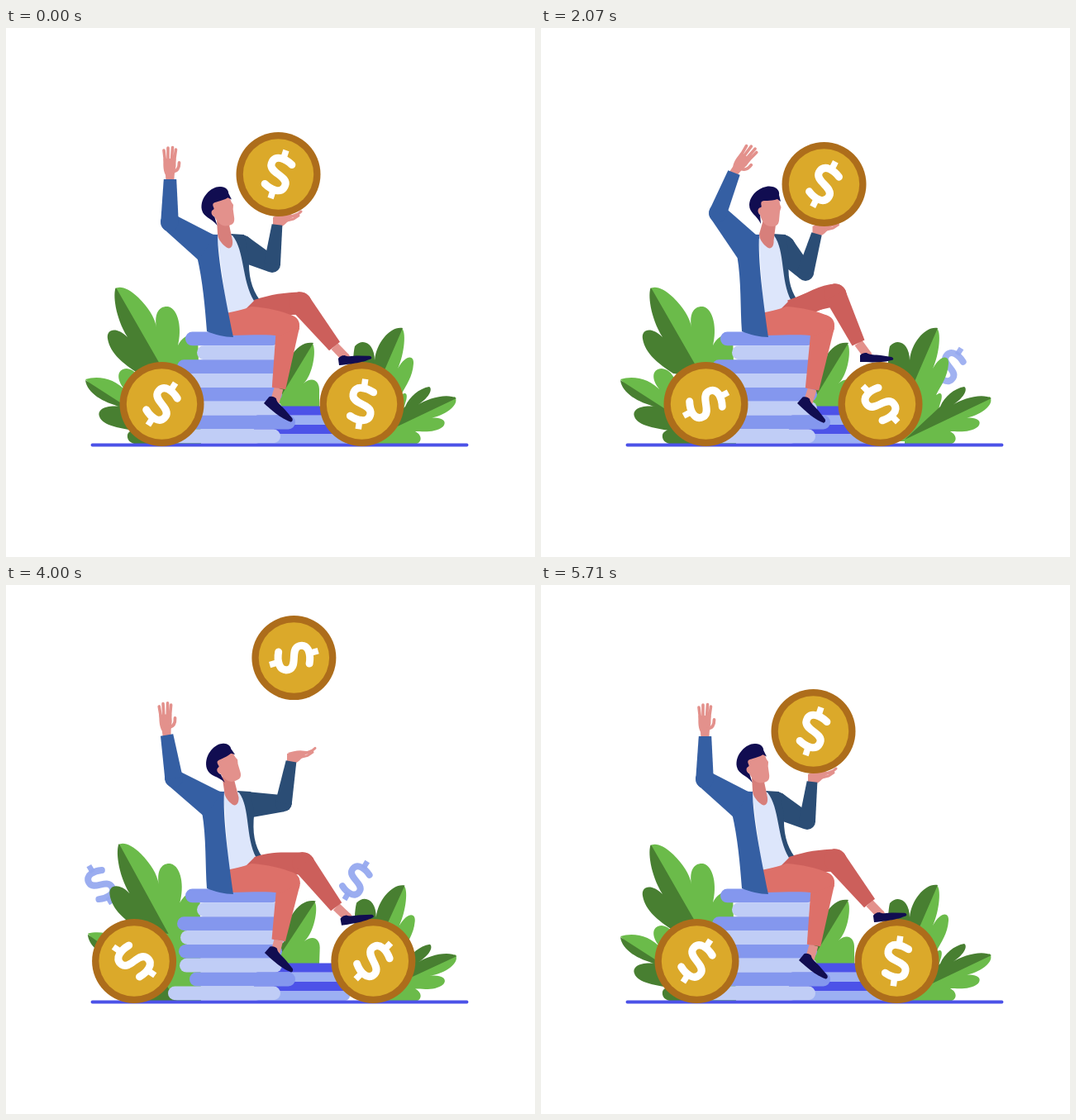
Animation of 640 by 640 pixels, one loop 5780 ms. Source, as an HTML page with a canvas:

```html
<!DOCTYPE html>
<html lang="en">
<head>
<meta charset="utf-8">
<title>Sitting on savings</title>
<style>
html, body { margin: 0; width: 100%; height: 100%; overflow: hidden; background: #fff; }
canvas { display: block; width: 100vw; height: 100vh; }
</style>
</head>
<body>
<canvas id="stage" width="640" height="640"></canvas>
<script>
const ctx = document.getElementById('stage').getContext('2d');
const LOOP = 5780;
const KEYS = [0, 790, 2070, 2930, 3570, 4500, 5710];
const C = {
  rim: '#ad6d1b', gold: '#dba92a', jacket: '#355fa3', sleeve: '#2b4d75', shirt: '#dde6fb',
  pants: '#dd7069', pantsBack: '#cc5f5b', skin: '#e3918c', neck: '#d77f7b', navy: '#110d51',
  leaf: '#6bbb4a', leafDark: '#487f31', book: '#8497ee', bookLight: '#c0cdf6',
  line: '#4c52e8', sky: '#9cb0f3'
};

// One value per key time; the last key repeats the first.
const pose = {
  lean: [0, 2, 8, 11, 10, 5],
  headX: [263, 267, 277, 274, 273, 265], headY: [222, 222, 222, 220, 220, 222],
  headTurn: [-13, -5, 0, -21, -23, -19],
  elbowX: [198, 204, 214, 208, 206, 200], elbowY: [235, 229, 224, 230, 231, 237],
  wristX: [198.5, 217, 233.5, 188, 199.5, 188.5], wristY: [183, 179, 175, 182, 179, 184.5],
  handTurn: [0, 24, 37, -12, 0, -7],
  farElbowX: [322, 319, 320, 339, 338, 332], farElbowY: [286, 291, 296, 266, 264, 265],
  farWristX: [328, 328.5, 333.5, 348.5, 347.5, 340.5], farWristY: [238, 243, 249, 216, 214, 213],
  kneeX: [356, 354, 356, 357, 359, 360], kneeY: [333, 330, 323, 329, 335, 338],
  cuffX: [397.5, 394, 384, 391, 398, 400.5], cuffY: [385, 383, 381, 383, 388, 390],
  heelX: [403, 398, 386, 394, 404, 407], heelY: [408, 407, 404, 407, 411, 412],
  heelTurn: [-8, -6, 0, -4, -10, -11],
  nearKneeX: [341, 341, 341, 343, 343, 340],
  nearCuffX: [330, 320.5, 328, 348, 347.5, 308], nearCuffY: [436, 434, 437, 433, 433, 426],
  nearHeelX: [312, 301, 310, 337, 336, 285], nearHeelY: [454, 448, 454, 454, 453, 436],
  nearHeelTurn: [39, 49, 41, 28, 27, 57],
  leftCoin: [188.5, 202, 199.5, 161.5, 153.5, 159.5],
  rightCoin: [430.5, 424.5, 410.5, 428, 442, 445.5],
  tossX: [329.5, 332.5, 342.5, 356, 353.5, 341],
  tossTurn: [18, 22, 27, -82, -118, -78],
  sway: [0, .3, 0, 0, 0, 2.6],
  tremble: [0, 1, 0, 0, 1, 1]
};
const TOSS_KEYS = [0, 640, 790, 1210, 2070, 2500, 2930, 3140, 3570, 4360, 4500, 5000, 5710];
const TOSS_Y = [177, 180, 183, 186, 189, 154, 97, 90, 85.5, 93, 100.5, 165, 177];

// Monotone cubic interpolation, at rest at both ends.
function track(t, values, keys = KEYS) {
  const v = i => values[i % values.length];
  const slope = i => (v(i + 1) - v(i)) / (keys[i + 1] - keys[i]);
  const last = keys.length - 1;
  if (t >= keys[last]) return v(last);
  const tangent = i => {
    if (i === 0 || i === last) return 0;
    const a = slope(i - 1), b = slope(i);
    return a * b > 0 ? 2 * a * b / (a + b) : 0;
  };
  let i = 0;
  while (t >= keys[i + 1]) i++;
  const h = keys[i + 1] - keys[i], u = (t - keys[i]) / h, w = 1 - u;
  return v(i) * (1 + 2 * u) * w * w + tangent(i) * h * u * w * w
    + v(i + 1) * u * u * (3 - 2 * u) - tangent(i + 1) * h * u * u * w;
}

const rad = deg => deg * Math.PI / 180;
const mix = (a, b, p) => a + (b - a) * p;

function fill(d, color) {
  ctx.fillStyle = color;
  ctx.fill(new Path2D(d));
}
function stroke(d, color, width, cap = 'round') {
  ctx.strokeStyle = color;
  ctx.lineWidth = width;
  ctx.lineCap = cap;
  ctx.lineJoin = cap === 'round' ? 'round' : 'miter';
  ctx.stroke(new Path2D(d));
}
function disc(x, y, r, color) {
  ctx.fillStyle = color;
  ctx.beginPath();
  ctx.arc(x, y, r, 0, 2 * Math.PI);
  ctx.fill();
}
function bar(x1, x2, y, h, color) {
  ctx.fillStyle = color;
  ctx.beginPath();
  ctx.roundRect(x1, y, x2 - x1, h, h / 2);
  ctx.fill();
}
function placed(x, y, turn, draw, sx = 1, sy = sx) {
  ctx.save();
  ctx.translate(x, y);
  ctx.rotate(rad(turn));
  ctx.scale(sx, sy);
  draw();
  ctx.restore();
}
function swung(x, y, turn, draw) {
  placed(x, y, turn, () => { ctx.translate(-x, -y); draw(); });
}
// Tapered limb: round at the first end, cut straight at the second.
function limb(x1, y1, r1, x2, y2, r2, color) {
  const len = Math.hypot(x2 - x1, y2 - y1), nx = (y1 - y2) / len, ny = (x2 - x1) / len;
  disc(x1, y1, r1, color);
  ctx.beginPath();
  ctx.moveTo(x1 + nx * r1, y1 + ny * r1);
  ctx.lineTo(x2 + nx * r2, y2 + ny * r2);
  ctx.lineTo(x2 - nx * r2, y2 - ny * r2);
  ctx.lineTo(x1 - nx * r1, y1 - ny * r1);
  ctx.fill();
}

function dollar(color) {
  stroke('M12-16C4-20-12-23-12-10C-12 2 12-2 12 10C12 23-4 20-12 16', color, 9);
  stroke('M0-30.5V-20M0 20V30.5', color, 7.5, 'butt');
}
function coin(x, y, turn) {
  disc(x, y, 51, C.rim);
  disc(x, y, 42.7, C.gold);
  placed(x, y, turn, () => dollar('#fff'));
}

// Runs draw(p) with a fade while t lies within the given life.
function floating(t, born, life, draw) {
  const p = (t - born) / life;
  if (p <= 0 || p >= 1) return;
  ctx.save();
  ctx.globalAlpha = Math.min(1, 5 * p, 2.4 * (1 - p));
  draw(p);
  ctx.restore();
}
function floatingDollar(t, born, life, x1, y1, x2, y2, turn1, turn2) {
  floating(t, born, life, p =>
    placed(mix(x1, x2, p), mix(y1, y2, p), mix(turn1, turn2, p), () => dollar('#95a8f0'), .88));
}

function shootingStar(t, born, life, from, bend, to, size) {
  const p = (t - born) / life;
  if (p <= 0 || p >= 1) return;
  const at = q => [0, 1].map(k =>
    (1 - q) ** 2 * from[k] + 2 * q * (1 - q) * bend[k] + q * q * to[k]);
  const head = Math.max(0, p - .1), tail = Math.max(0, 2.5 * p - 1.5);
  ctx.save();
  ctx.globalAlpha = Math.min(1, 4 * (1 - p));
  ctx.strokeStyle = '#9fb0f0';
  ctx.lineCap = 'butt';
  for (let i = 0; i < 24 && head > tail; i++) {
    ctx.lineWidth = mix(size * .36, 1, i / 24);
    ctx.beginPath();
    ctx.moveTo(...at(mix(tail, head, i / 24)));
    ctx.lineTo(...at(mix(tail, head, Math.min(1, (i + 1.3) / 24))));
    ctx.stroke();
  }
  const [x, y] = at(p);
  placed(x, y, 3, () => {
    ctx.beginPath();
    for (let i = 0; i < 10; i++) {
      const a = rad(i * 36 - 90), r = i % 2 ? .5 * size : size;
      ctx.lineTo(r * Math.cos(a), r * Math.sin(a));
    }
    ctx.closePath();
    ctx.fillStyle = ctx.strokeStyle = '#b6c3f5';
    ctx.fill();
    ctx.lineWidth = 1.5;
    ctx.lineJoin = 'round';
    ctx.stroke();
  }, Math.min(1, 4 * p));
  ctx.restore();
}

function plants(sway, tremble) {
  swung(170, 490, 2.5 * tremble, () => {
    fill('M96 425C112 420 132 424 146 440C132 426 134 412 146 412C160 414 165 425 180 480L120 450Z', C.leaf);
    fill('M96 426C98 442 118 453 138 458C120 456 110 462 113 470C117 482 140 484 160 488L180 480Z', C.leafDark);
  });
  swung(190, 500, sway, () => {
    fill('M132 316C136 311 148 314 160 326C172 338 180 350 182 362C179 344 186 336 196 337C209 340 213 364 208 384C214 372 225 368 232 372L236 504H190L158 400Z', C.leaf);
    fill('M133 314C129 321 132 350 147 374C134 361 121 364 123 376C126 394 142 406 160 418L195 422L187 408Z', C.leafDark);
  });
  fill('M147 492C150 484 165 484 185 470L207 504H160C150 503 146 498 147 492Z', C.leafDark);
  swung(330, 458, 2 * tremble, () => {
    fill('M371 382C376 390 371 420 360 430C370 421 380 426 379 440V459H325L345 415Z', C.leaf);
    fill('M372 381C352 378 336 400 325 458Z', C.leafDark);
  });
  swung(450, 500, sway * .9, () => {
    fill('M478 363C485 365 482 395 474 412C484 394 494 396 493 406C492 422 484 432 478 444C486 438 486 446 483 454L470 500H425L440 420Z', C.leaf);
    fill('M480 363C466 360 448 380 446 402C446 382 432 374 422 385C418 400 420 450 425 490Z', C.leafDark);
  });
  swung(440, 500, .6 * tremble, () => {
    fill('M543 446C550 456 530 470 512 472C528 470 534 476 529 482C520 490 505 488 495 488C503 492 504 500 497 503C480 507 455 506 440 503V494Z', C.leaf);
    fill('M545 448C534 441 510 448 498 456C514 446 516 436 512 434C500 436 488 446 483 458L440 498Z', C.leafDark);
  });
}

function books() {
  for (let i = 0; i < 4; i++) bar(300, 416, 457.5 + 11.3 * i, 11.3, i % 2 ? C.sky : C.line);
  [[217, 330], [231, 347], [207, 333], [211, 338], [209, 334], [210, 334], [222, 350], [196, 332]]
    .forEach(([x1, x2], i) => bar(x1, x2, 367.5 + 16.85 * i, 16.85, i % 2 ? C.bookLight : C.book));
}

function shoeAndAnkle(cuffX, cuffY, heelX, heelY, turn, height) {
  const a = rad(turn), lx = 9, ly = -8 * height;
  limb(heelX + lx * Math.cos(a) - ly * Math.sin(a), heelY + lx * Math.sin(a) + ly * Math.cos(a), 5.5,
    cuffX, cuffY, 5.5, C.skin);
  placed(heelX, heelY, turn, () =>
    fill('M0 0L0-8C3-11 5-11 8-11C12-8 18-9 25-8L38-6C41-5 41-2 38-2C30 0 22 1 0 0Z', C.navy), 1, height);
}

function raisedHand() {
  fill('M-5 2L-5.5-5C-9-12-8-20-8-25H7L7-16C6-10 5-6 5 2Z', C.skin);
  stroke('M-6-22L-7.5-35M-2.5-24L-2.5-38M2-24L3-38.5M5-22L7-36', C.skin, 3.6);
  stroke('M4-9C9-10 11-14 11-20', C.skin, 3.8);
}

function head() {
  disc(-12, -1, 4, C.skin);
  fill('M-12-17H11L12-9L13.5-5L12 0L11 11C10 17 7 18 2 18C-5 18-9 14-12 4Z', C.skin);
  fill('M-25-8C-24-24-6-33 3-30C9-29 12-24 11-20L13-12L9-15C0-12-8-14-10-12C-12-9-9-6-11-5C-16-4-15 2-12 4L-11 15C-16 4-25 2-25-8Z', C.navy);
}

function person(m, t) {
  const u = m.lean;
  // A torso point, leaning about the hips.
  const s = (x, y) => `${x + u * Math.min(1.1, (374 - y) / 124)} ${y} `;

  placed(m.farWristX, m.farWristY, 0, () => {
    fill('M-5 2L-5-9C0-12 6-13 11-13L21-12L10-1C8 1 6 2 5 2Z', C.skin);
    stroke('M10-8L23-11L29-16M10-7L25-13', C.skin, 3);
    stroke('M8-4L20-7L26-11', C.skin, 3);
  });
  coin(m.tossX, track(t, TOSS_Y, TOSS_KEYS), m.tossTurn);

  limb(284 + u, 266, 16, m.farElbowX, m.farElbowY, 10, C.sleeve);
  limb(m.farElbowX, m.farElbowY, 10, m.farWristX, m.farWristY, 6.4, C.sleeve);
  fill(`M${s(272, 249)}L${s(288, 250)}L${s(294, 276)}C${s(293, 300)}${s(297, 315)}${s(307, 329)}L${s(296, 331)}Z`, C.sleeve);
  fill(`M${s(255, 249)}L${s(274, 251)}C${s(289, 270)}${s(285, 305)}${s(300, 330)}L${s(296, 345)}L${s(268, 348)}Z`, C.shirt);

  shoeAndAnkle(m.cuffX, m.cuffY, m.heelX, m.heelY, m.heelTurn, 1);
  limb(m.kneeX, m.kneeY, 13.5, 301, 339, 10, C.pantsBack);
  fill(`M290 340L301 329C320 322 338 ${m.kneeY - 13} ${m.kneeX} ${m.kneeY - 13.5}L${m.kneeX - 6} ${m.kneeY + 13}L324 347Z`, C.pantsBack);
  limb(m.kneeX, m.kneeY, 13.5, m.cuffX, m.cuffY, 8.3, C.pantsBack);

  shoeAndAnkle(m.nearCuffX, m.nearCuffY, m.nearHeelX, m.nearHeelY, m.nearHeelTurn, 1.25);
  limb(m.nearKneeX, 361, 14, m.nearCuffX, m.nearCuffY, 8.3, C.pants);
  fill(`M266 345C280 342 290 340 297 337C315 338 335 343 ${m.nearKneeX + 6} 348C${m.nearKneeX + 12} 351 ${m.nearKneeX + 14} 354 ${m.nearKneeX + 14} 362L${m.nearKneeX - 10} 373C315 370 295 372 272 372Z`, C.pants);

  fill(`M${s(233, 249)}L${s(256, 250)}C${s(256, 280)}${s(266, 330)}275 374C264 374 253 371 243 367C241 340 ${s(238, 305)}${s(231, 276)}Z`, C.jacket);
  placed(m.wristX, m.wristY, m.handTurn, raisedHand);
  limb(m.elbowX, m.elbowY, 10.8, 243 + u, 266, 18, C.jacket);
  limb(m.elbowX, m.elbowY, 10.8, m.wristX, m.wristY, 7.7, C.jacket);

  fill(`M${m.headX - 8} ${m.headY + 10}L${m.headX + 7} ${m.headY + 16}L${s(274, 257)}C${s(275, 266)}${s(270, 269)}${s(265, 264)}C${s(260, 260)}${s(256, 254)}${s(256, 249)}Z`, C.neck);
  placed(m.headX, m.headY, m.headTurn, head);
}

function draw(t) {
  const m = {};
  for (const name in pose) m[name] = track(t, pose[name]);
  ctx.fillStyle = '#fff';
  ctx.fillRect(0, 0, 640, 640);

  floatingDollar(t, 1850, 1250, 502, 433, 458, 304, 35, 19);
  floatingDollar(t, 2650, 800, 510, 430, 532, 344, 41, 41);
  floatingDollar(t, 3515, 800, 413, 400, 430, 330, 25, 35);
  floatingDollar(t, 3515, 800, 136, 413, 100, 330, -25, -35);
  plants(m.sway, m.tremble);
  books();
  stroke('M104.5 504.5H557.5', C.line, 3.8);
  coin(m.rightCoin, 455, 8 + 2.6 * (m.rightCoin - 430.5));

  floating(t, 2500, 540, () => stroke('M284 213L290 209L295 214L301 209L307 215L312 212', C.skin, 3.5, 'butt'));
  floating(t, 2980, 678, p => placed(mix(395, 383.5, p), mix(340, 313.5, p), 0, () =>
    fill('M-18-12L-2-17L2-8C8-4 14-7 19-6C23-4 22 1 17 2L11 4L10 14L5 17L-9 19L-15 11Z', C.skin)));
  for (const born of [3246, 4520])
    shootingStar(t, born, 540, [201, 268], [165, 194], [62, 228], 17);
  shootingStar(t, 4160, 550, [346, 279], [356, 246], [425, 250], 11.5);

  person(m, t);
  coin(m.leftCoin, 455, 33 + 2.65 * (m.leftCoin - 188.5));
}

const start = performance.now();
function frame() {
  draw((performance.now() - start) % LOOP);
  requestAnimationFrame(frame);
}
frame();
</script>
</body>
</html>
```
